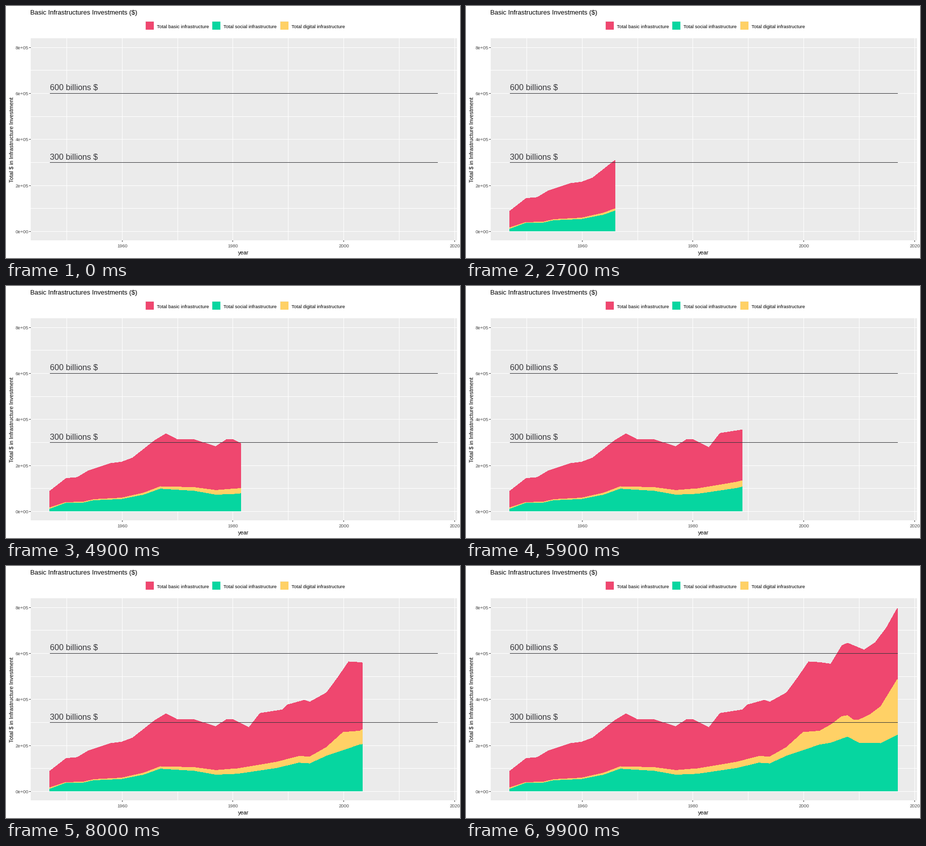
Recreate the animation shown at these times as a matplotlib script. Size 900 by 500 pixels, loop 10000 ms.

```python
import numpy as np
import matplotlib.pyplot as plt
from matplotlib.animation import FuncAnimation
from matplotlib.patches import Polygon, Rectangle

W, H, DPI = 900, 500, 100
FRAMES, INTERVAL = 100, 100
PINK, GREEN, YELLOW = "#EF476F", "#06D6A0", "#FFD166"
DARK = "#36363A"

# Turning points of each series (year: thousands), straight in between
TOTAL = {1947: 89, 1950: 145, 1952: 149, 1954: 178, 1958: 210, 1960: 216,
         1962: 234, 1966: 310, 1968: 339, 1970: 314, 1973: 314, 1977: 283,
         1979: 315, 1980: 315, 1983: 279, 1985: 341, 1989: 356, 1990: 378,
         1993: 398, 1994: 390, 1997: 430, 1999: 495, 2001: 565, 2003: 562,
         2005: 555, 2007: 635, 2008: 646, 2011: 616, 2013: 648, 2015: 711,
         2017: 797}
SOCIAL = {1947: 11, 1950: 38, 1953: 38, 1955: 49, 1960: 54, 1964: 73,
          1967: 99, 1973: 90, 1977: 73, 1981: 77, 1988: 102, 1992: 125,
          1994: 122, 1997: 155, 2003: 204, 2005: 212, 2008: 238, 2010: 212,
          2014: 210, 2017: 246}
DIGITAL = {1947: 6, 1950: 3, 1960: 6, 1968: 11, 1980: 23, 1994: 30,
           1997: 38, 2000: 79, 2003: 60, 2007: 98, 2009: 88, 2012: 123,
           2014: 160, 2017: 242}

years = np.arange(1947, 2018)
# Each year is reached on a whole frame; frames in between interpolate
key_frames = np.round((years - years[0]) * (FRAMES - 1) / 70)


def series(points):
    return np.interp(years, list(points), list(points.values()))


def px(year):
    return 229.75 + (year - 1960) * 10.98


def py(thousands):
    return 447.4 - thousands * 0.4565


plt.rcParams["font.family"] = "Liberation Sans"
fig = plt.figure(figsize=(W / DPI, H / DPI), dpi=DPI, facecolor="white")
ax = fig.add_axes([0, 0, 1, 1])
ax.set_xlim(0, W)
ax.set_ylim(H, 0)
ax.axis("off")


def box(x, y, w, h, color, z=1):
    ax.add_patch(Rectangle((x, y), w, h, facecolor=color, linewidth=0,
                           antialiased=False, zorder=z))


def label(x, y, text, size, color="black", ha="left", **kw):
    ax.text(x, y, text, fontsize=size * 72 / DPI, color=color, ha=ha,
            va="baseline", zorder=5, **kw)


# Panel, grid and axes
box(49, 64, 845, 401, "#EBEBEB", 0)
for v in range(0, 900, 100):
    y = int(py(v))
    box(49, y, 845, 1, "white")
    if v % 200 == 0:
        box(46, y, 3, 1, "#333333")
        label(44.5, y + 4, f"{v * 1000:.0e}", 9.3, "#4D4D4D", "right")
for year in range(1950, 2021, 10):
    x = round(px(year))
    box(x, 64, 1, 401, "white")
    if year % 20 == 0:
        box(x, 465, 1, 3, "#333333")
        label(x + 0.5, 479, str(year), 9.3, "#4D4D4D", "center")

# Reference levels
for v in (300, 600):
    y = int(py(v))
    box(87, y, 769, 1, DARK, 4)
    label(87, y - 6, f"{v} billions $", 16.3, DARK)

# Titles and legend
label(48.5, 17, "Basic Infrastructures Investments ($)", 13)
label(471, 493, "year", 11, ha="center")
label(15.5, 265, "Total $ in Infrastructure Investment", 11, ha="center",
      rotation=90, rotation_mode="anchor")
for x, color, kind in ((277, PINK, "basic"), (409, GREEN, "social"),
                       (544, YELLOW, "digital")):
    box(x - 1, 30, 17, 17, "#F2F2F2")
    box(x, 31, 16, 16, color, 2)
    label(x + 22, 44, f"Total {kind} infrastructure", 9.5)

# Stacked areas, tallest first so that each covers the one behind
areas = []
social = series(SOCIAL)
for edge, color in ((series(TOTAL), PINK),
                    (social + series(DIGITAL), YELLOW),
                    (social, GREEN)):
    patch = Polygon(np.zeros((3, 2)), closed=True, facecolor=color,
                    linewidth=0, antialiased=False, zorder=3)
    ax.add_patch(patch)
    areas.append((patch, edge))


def update(frame):
    end = np.interp(frame, key_frames, years)
    t = np.append(years[years < end], end)
    # Aliased fills paint every touched pixel, so pull the edges in by half
    x = px(t) - 0.5
    base = py(0) - 0.5
    for patch, edge in areas:
        top = np.column_stack([x, py(np.interp(t, years, edge)) + 0.5])
        patch.set_xy(np.vstack([top, [[x[-1], base], [x[0], base]]]))
        patch.set_visible(frame > 0)
    return [patch for patch, _ in areas]


anim = FuncAnimation(fig, update, frames=FRAMES, interval=INTERVAL,
                     repeat=True, repeat_delay=0)
plt.show()
```
